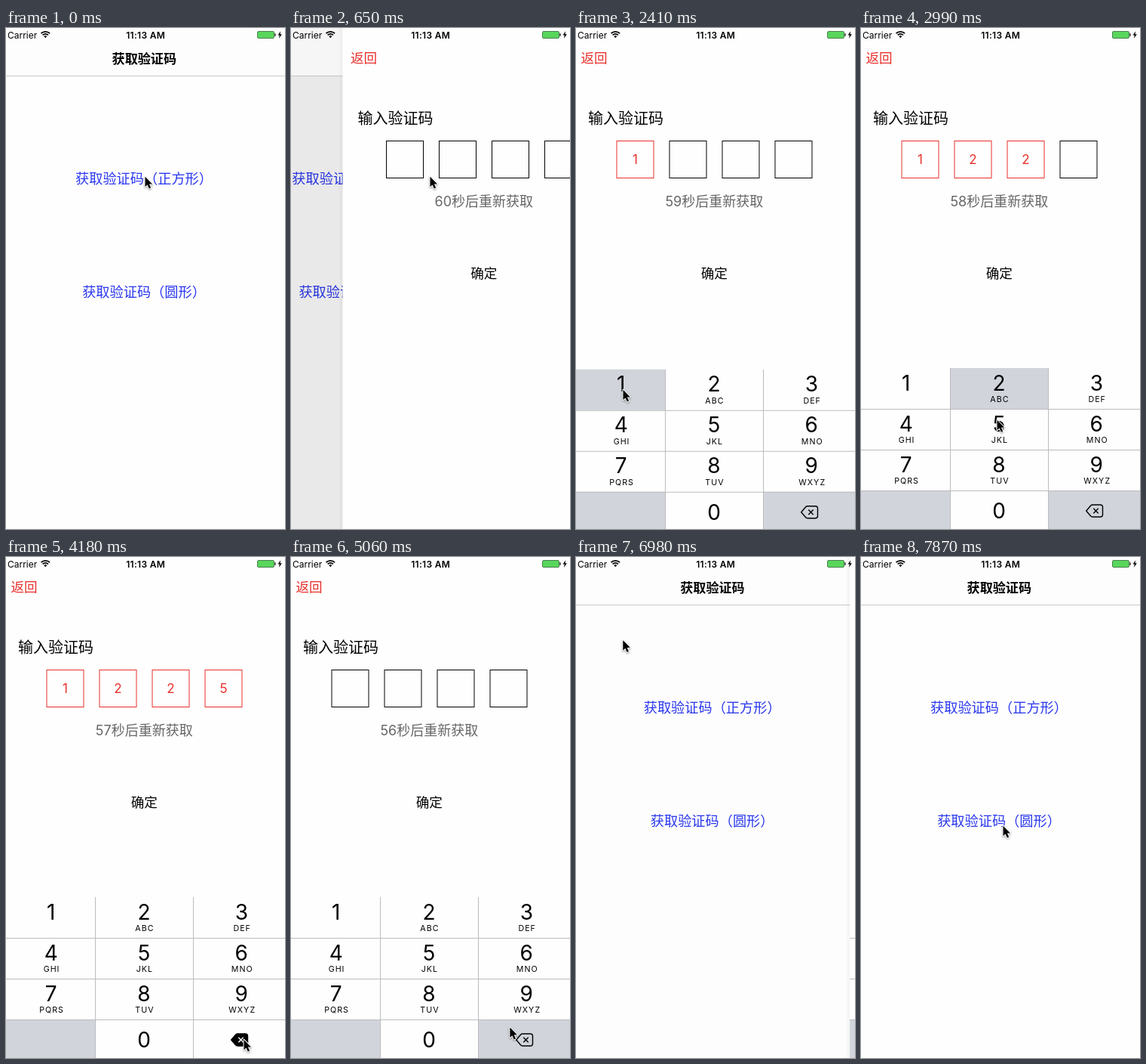
Write an HTML page with a canvas that moves like this. It is 370 by 663 pixels and loops after 8 s.

```html
<!DOCTYPE html>
<html lang="zh-CN">
<head>
<meta charset="utf-8">
<title>获取验证码</title>
<style>
html, body { margin: 0; width: 100%; height: 100%; overflow: hidden; background: #fefefe; }
canvas { display: block; width: 370px; height: 663px; }
</style>
</head>
<body>
<canvas id="stage"></canvas>
<script>
const W = 370, H = 663, LOOP = 8000;
const SCREEN = 375, LEFT = -4, MID = 183.3;
const FONT = 'Inter, "Noto Sans CJK SC", "Noto Sans CJK", sans-serif';
const BG = '#fefefe', RED = '#e8302b', BLUE = '#2b38ee', GREY = '#d1d4db';

const canvas = document.getElementById('stage');
const ctx = canvas.getContext('2d');
const dpr = window.devicePixelRatio || 1;
canvas.width = W * dpr;
canvas.height = H * dpr;

// Pointer path: time, x, y of the tip
const PATH = [
  [0, 184, 196], [1390, 184, 196], [1827, 170, 309], [2270, 62, 478],
  [2420, 62, 478], [2560, 178, 478], [2860, 178, 478], [3005, 180, 518],
  [3150, 181, 528], [3300, 182, 530], [3740, 315, 638], [4922, 315, 638],
  [5069, 290, 622], [5500, 180, 400], [6100, 9, 81], [6248, 25.3, 54.5],
  [6400, 26, 42], [6550, 26, 42], [7280, 86, 155], [7575, 150, 290],
  [7722, 188, 364], [7870, 188, 355]
];

// Key presses: key, down, up
const PRESSES = [
  ['1', 2250, 2430], ['2', 2540, 2640], ['2', 2800, 3050], ['5', 3130, 3280],
  ['del', 4000, 4250], ['del', 4400, 4550], ['del', 4700, 4850]
];
const TYPED = [['1', 2340], ['2', 2600], ['2', 2830], ['5', 3220]];
const ERASED = [4300, 4450, 4750, 4900];
const LETTERS = ['', '', 'ABC', 'DEF', 'GHI', 'JKL', 'MNO', 'PQRS', 'TUV', 'WXYZ'];

function sample(t) {
  if (t < 500) return 0;
  const step = 147.4;
  return 500 + step * Math.floor((t - 482) / step);
}

// Remaining share of a spring that starts at t0
function rest(t, t0) {
  if (t <= t0) return 1;
  const r = Math.exp(-7.5 * (t - t0) / 1000);
  return r < 0.004 ? 0 : r;
}

function rect(x, y, w, h, color) {
  ctx.fillStyle = color;
  ctx.fillRect(x, y, w, h);
}

function text(str, x, y, size, color = '#000', { align = 'center', weight = 400, gap = 0 } = {}) {
  ctx.font = `${weight} ${size}px ${FONT}`;
  ctx.letterSpacing = gap + 'px';
  ctx.textAlign = align;
  ctx.fillStyle = color;
  ctx.fillText(str, x + gap / 2, y);
}

function poly(points) {
  ctx.beginPath();
  points.forEach(([x, y]) => ctx.lineTo(x, y));
  ctx.closePath();
}

function shifted(dx, dy, draw) {
  ctx.save();
  ctx.translate(dx, dy);
  draw();
  ctx.restore();
}

function drawHome(covered) {
  const slide = -0.3 * SCREEN * covered;
  rect(0, 0, W, H, BG);
  shifted(slide, 0, () => {
    text('获取验证码（正方形）', 183, 206, 18.2, BLUE);
    text('获取验证码（圆形）', 183, 356, 18.2, BLUE);
  });
  rect(0, 64, W, H, `rgba(0,0,0,${0.1 * covered})`);
  rect(0, 0, W, 63, '#fdfdfd');
  shifted(slide, 0, () => {
    ctx.globalAlpha = Math.max(0, 1 - 1.4 * covered);
    text('获取验证码', MID, 47, 17.1, '#000', { weight: 600 });
  });
  rect(0, 63, W, 1, '#c8c8c8');
  rect(0, 0, W, 64, `rgba(0,0,0,${0.035 * covered})`);
}

function drawDelete(pressed) {
  ctx.beginPath();
  ctx.moveTo(298.7, 639);
  ctx.lineTo(304.5, 632.2);
  ctx.quadraticCurveTo(305.6, 631, 307.2, 631);
  ctx.lineTo(317.5, 631);
  ctx.quadraticCurveTo(320.5, 631, 320.5, 634);
  ctx.lineTo(320.5, 644);
  ctx.quadraticCurveTo(320.5, 647, 317.5, 647);
  ctx.lineTo(307.2, 647);
  ctx.quadraticCurveTo(305.6, 647, 304.5, 645.8);
  ctx.closePath();
  ctx.lineWidth = 1.4;
  ctx.lineJoin = 'round';
  ctx.strokeStyle = '#000';
  ctx.stroke();
  if (pressed) {
    ctx.fillStyle = '#000';
    ctx.fill();
  }
  ctx.strokeStyle = pressed ? '#fff' : '#000';
  ctx.beginPath();
  ctx.moveTo(308.3, 635.8);
  ctx.lineTo(314.7, 642.2);
  ctx.moveTo(314.7, 635.8);
  ctx.lineTo(308.3, 642.2);
  ctx.stroke();
}

function drawKeyboard(t) {
  const press = PRESSES.find(([, down, up]) => t >= down && t < up);
  const held = press ? press[0] : '';
  const cols = [LEFT, 118, 248, 371];
  const mids = [59.7, 183, 312.3];
  rect(LEFT, 450, SCREEN, 216, BG);
  rect(LEFT, 612, 122, 54, GREY);
  if (held !== 'del') rect(248, 612, 123, 54, GREY);
  for (let n = 1; n <= 9; n++) {
    const c = (n - 1) % 3, y = 450 + 54 * Math.floor((n - 1) / 3);
    if (held === String(n)) rect(cols[c], y, cols[c + 1] - cols[c], 54, GREY);
    text(String(n), mids[c], y + 29.7, 28);
    text(LETTERS[n], mids[c] + 0.4, y + 45, 10.7, '#000', { gap: 1 });
  }
  text('0', mids[1], 648.8, 28);
  [504, 558, 612].forEach(y => rect(LEFT, y, SCREEN, 1, '#bcbcbf'));
  [118, 248].forEach(x => rect(x, 450, 1, 216, '#bcbcbf'));
  drawDelete(held === 'del');
}

function drawCodePage(t) {
  rect(LEFT, 0, SCREEN, H, BG);
  text('返回', 6.5, 46, 17.6, RED, { align: 'left' });
  text('输入验证码', 16, 127, 20, '#000', { align: 'left' });
  const erased = ERASED.filter(at => t >= at).length;
  const count = TYPED.filter(([, at]) => t >= at).length - erased;
  for (let i = 0; i < 4; i++) {
    const on = i < count, x = 54 + 70 * i;
    ctx.lineWidth = 1;
    ctx.lineJoin = 'miter';
    ctx.strokeStyle = on ? RED : '#000';
    ctx.strokeRect(x, 149.5, 49, 49);
    if (on) text(TYPED[i][0], x + 24.5, 180, 17, RED);
  }
  const left = 60 - Math.max(0, Math.floor((t - 500) / 1000));
  text(left + '秒后重新获取', MID, 236, 18, '#666');
  text('确定', MID, 331, 17.6);
  const drop = 216 * rest(t, 1773.5);
  if (drop < 216) shifted(0, drop, () => drawKeyboard(t));
}

function drawStatus() {
  text('Carrier', 2, 14, 12, '#000', { align: 'left' });
  text('11:13 AM', 185, 14, 12, '#000', { weight: 600, gap: 0.3 });
  // Wi-Fi fan
  ctx.strokeStyle = '#000';
  ctx.lineWidth = 1.7;
  [8.2, 5.2].forEach(r => {
    ctx.beginPath();
    ctx.arc(52.3, 13, r, -Math.PI * 0.75, -Math.PI * 0.25);
    ctx.stroke();
  });
  ctx.fillStyle = '#000';
  ctx.beginPath();
  ctx.moveTo(52.3, 13.3);
  ctx.arc(52.3, 13, 2.8, -Math.PI * 0.75, -Math.PI * 0.25);
  ctx.fill();
  // Battery
  ctx.beginPath();
  ctx.roundRect(333.5, 4.5, 22, 9, 1.5);
  ctx.fillStyle = '#58d75c';
  ctx.fill();
  ctx.lineWidth = 1;
  ctx.strokeStyle = '#4b7f4e';
  ctx.stroke();
  rect(356.3, 7.3, 1.4, 3.4, '#222');
  poly([[364.2, 4.3], [360.5, 9.6], [362.8, 9.6], [361.9, 13.7], [365.9, 8.2], [363.5, 8.2]]);
  ctx.fillStyle = '#000';
  ctx.fill();
}

function drawPointer(t) {
  let i = 0;
  while (i < PATH.length - 2 && t >= PATH[i + 1][0]) i++;
  const [t0, x0, y0] = PATH[i], [t1, x1, y1] = PATH[i + 1];
  const k = Math.min(1, (t - t0) / (t1 - t0));
  shifted(x0 + (x1 - x0) * k, y0 + (y1 - y0) * k, () => {
    poly([[0.5, 0.8], [0.5, 14.2], [3.5, 11.4], [5.8, 16.6], [8.2, 15.6], [5.9, 10.6], [10, 10.4]]);
    ctx.lineJoin = 'round';
    ctx.lineWidth = 2;
    ctx.strokeStyle = '#fff';
    ctx.shadowColor = 'rgba(0,0,0,0.4)';
    ctx.shadowBlur = 2.5 * dpr;
    ctx.shadowOffsetY = dpr;
    ctx.stroke();
    ctx.shadowColor = 'transparent';
    ctx.fillStyle = '#000';
    ctx.fill();
  });
}

function draw(t) {
  ctx.setTransform(dpr, 0, 0, dpr, 0, 0);
  const away = t < 6470 ? rest(t, 428.3) : 1 - rest(t, 6470);
  drawHome(1 - away);
  if (away < 1) {
    shifted(SCREEN * away, 0, () => {
      if (away > 0) {
        const shade = ctx.createLinearGradient(LEFT - 5, 0, LEFT, 0);
        shade.addColorStop(0, 'rgba(0,0,0,0.01)');
        shade.addColorStop(1, 'rgba(0,0,0,0.04)');
        rect(LEFT - 5, 0, 5, H, shade);
      }
      drawCodePage(t);
    });
  }
  drawStatus();
  drawPointer(t);
}

function tick() {
  draw(sample(performance.now() % LOOP));
  requestAnimationFrame(tick);
}
tick();
</script>
</body>
</html>
```
